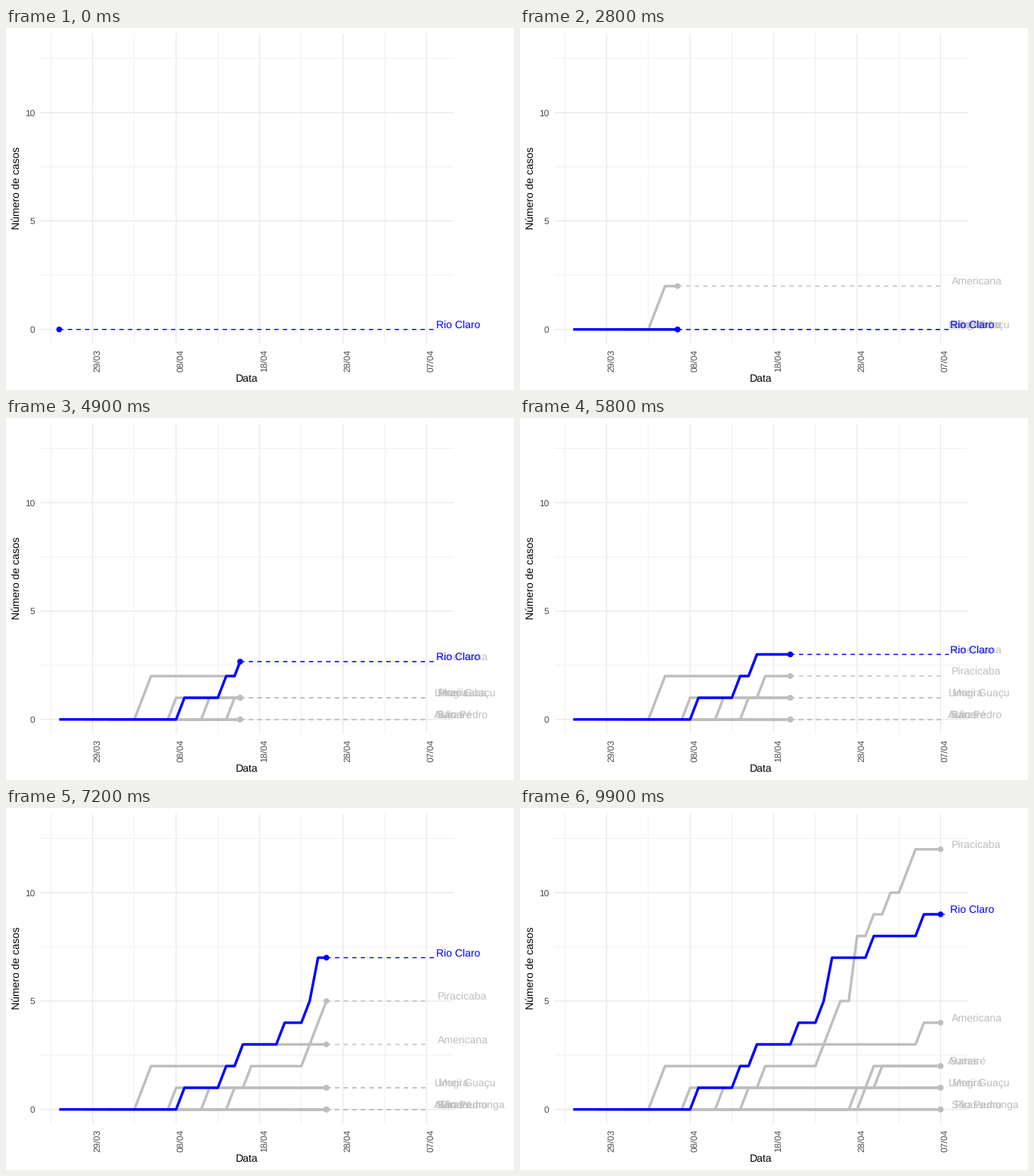
These frames come from a looping animation (672 px wide and 480 px high, 10000 ms). A matplotlib script:

```python
import matplotlib.pyplot as plt
import numpy as np
from matplotlib.animation import FuncAnimation
from matplotlib.patches import Circle

plt.rcParams.update({
    "font.family": "Liberation Sans",
    "text.hinting": "none",
    "text.hinting_factor": 1,
    "path.snap": False,
})

W, H, DPI = 672, 480, 96
FRAMES, LAST_DAY = 100, 44
LEFT, RIGHT, TOP, BOTTOM = 45.7, 592.3, 7.3, 418.4
X0, DAY_W = 70.4, 11.045
Y0, UNIT_H = 399.7, 28.746
THIN, MID, THICK = 0.711, 1.4226, 3.414
GREY, BLUE, GRID, TICK = "#BEBEBE", "#0000FF", "#EBEBEB", "#4D4D4D"
MAIN = "Rio Claro"

# city: first day shown, days on which a case is added
CITIES = {
    "Araras": (13, [34, 36]),
    "Sumaré": (12, [35, 37]),
    "Limeira": (6, [21]),
    "Mogi Guaçu": (6, [14]),
    "São Pedro": (3, []),
    "Pirassununga": (28, []),
    "Americana": (6, [10, 11, 22, 42]),
    "Piracicaba": (9, [18, 23, 30, 31, 32, 34, 34, 34, 36, 38, 40, 41]),
    MAIN: (0, [15, 20, 22, 27, 30, 31, 31, 36, 42]),
}
DAYS = np.arange(LAST_DAY + 1)


def px(day):
    return X0 + DAY_W * np.asarray(day)


def py(cases):
    return Y0 - UNIT_H * np.asarray(cases)


def pt(pixels):
    return pixels * 72 / DPI


fig = plt.figure(figsize=(W / DPI, H / DPI), dpi=DPI, facecolor="white")
ax = fig.add_axes([0, 0, 1, 1])
ax.set_xlim(0, W)
ax.set_ylim(H, 0)
ax.axis("off")


def stroke(xs, ys, color, width, **kw):
    return ax.plot(xs, ys, color=color, lw=pt(width), solid_capstyle="butt",
                   dash_capstyle="butt", solid_joinstyle="round", **kw)[0]


def grid(xs, ys, width):
    for x in xs:
        stroke([x, x], [TOP, BOTTOM], GRID, width, zorder=0)
    for y in ys:
        stroke([LEFT, RIGHT], [y, y], GRID, width, zorder=0)


def label(x, y, text, size=10.8, color="black", **kw):
    return ax.text(x, y, text, fontsize=size, color=color, va="baseline",
                   rotation_mode="anchor", **kw)


def draw_axes():
    ticks = range(4, LAST_DAY + 1, 10)
    counts = range(0, 11, 5)
    grid(px(range(-1, LAST_DAY, 10)), py([2.5, 7.5, 12.5]), THIN)
    grid(px(ticks), py(counts), MID)
    for day in ticks:
        month, date = divmod(day + 24, 31)   # day 0 is 25 March
        if month:
            month, date = 1 + (date > 29), date % 30
        label(px(day) + 9.3, 440.6, f"{date + 1:02}/{month + 3:02}", 9, TICK,
              ha="center", rotation=90)
    for n in counts:
        label(38, py(n) + 4.3, str(n), 9, TICK, ha="right")
    label(319, 469, "Data", ha="center")
    label(18, 212, "Número de casos", ha="center", rotation=90)


class Series:
    def __init__(self, name, first, case_days):
        main = name == MAIN
        color, z = (BLUE, 10) if main else (GREY, 2)
        self.first = first
        self.end = float(px(LAST_DAY + main))
        self.total = np.searchsorted(case_days, DAYS, side="right")
        self.dash = stroke([], [], color, MID, ls=(0, (4, 4)), zorder=z)
        self.line = stroke([], [], color, THICK, zorder=z + 1)
        self.dot = ax.add_patch(Circle((0, 0), 3.8, fc=color, lw=0,
                                       zorder=z + 2))
        self.text = label(0, 0, name, color=color, zorder=z + 3)
        width = self.text.get_window_extent().width
        self.text.set_x(px(LAST_DAY) + 0.2 * width + 1)
        self.parts = self.dash, self.line, self.dot, self.text

    def height(self, day):
        return py(np.interp(day, DAYS, self.total))

    def show(self, day):
        visible = day >= self.first
        for part in self.parts:
            part.set_visible(visible)
        if not visible:
            return
        past = np.append(np.arange(self.first, np.ceil(day)), day)
        x, y = float(px(day)), float(self.height(day))
        self.line.set_data(px(past), self.height(past))
        self.dash.set_data([x, self.end], [y, y])
        self.dot.center = x, y
        self.text.set_y(y - 2.1)


draw_axes()
series = [Series(name, *spec) for name, spec in CITIES.items()]

# each day falls on a whole frame; motion is linear in between
KEYS = np.round(DAYS * (FRAMES - 1) / LAST_DAY)


def update(frame):
    day = np.interp(frame, KEYS, DAYS)
    for s in series:
        s.show(day)
    return [part for s in series for part in s.parts]


anim = FuncAnimation(fig, update, frames=FRAMES, interval=100, repeat=True,
                     repeat_delay=0, init_func=lambda: update(0))
plt.show()
```
